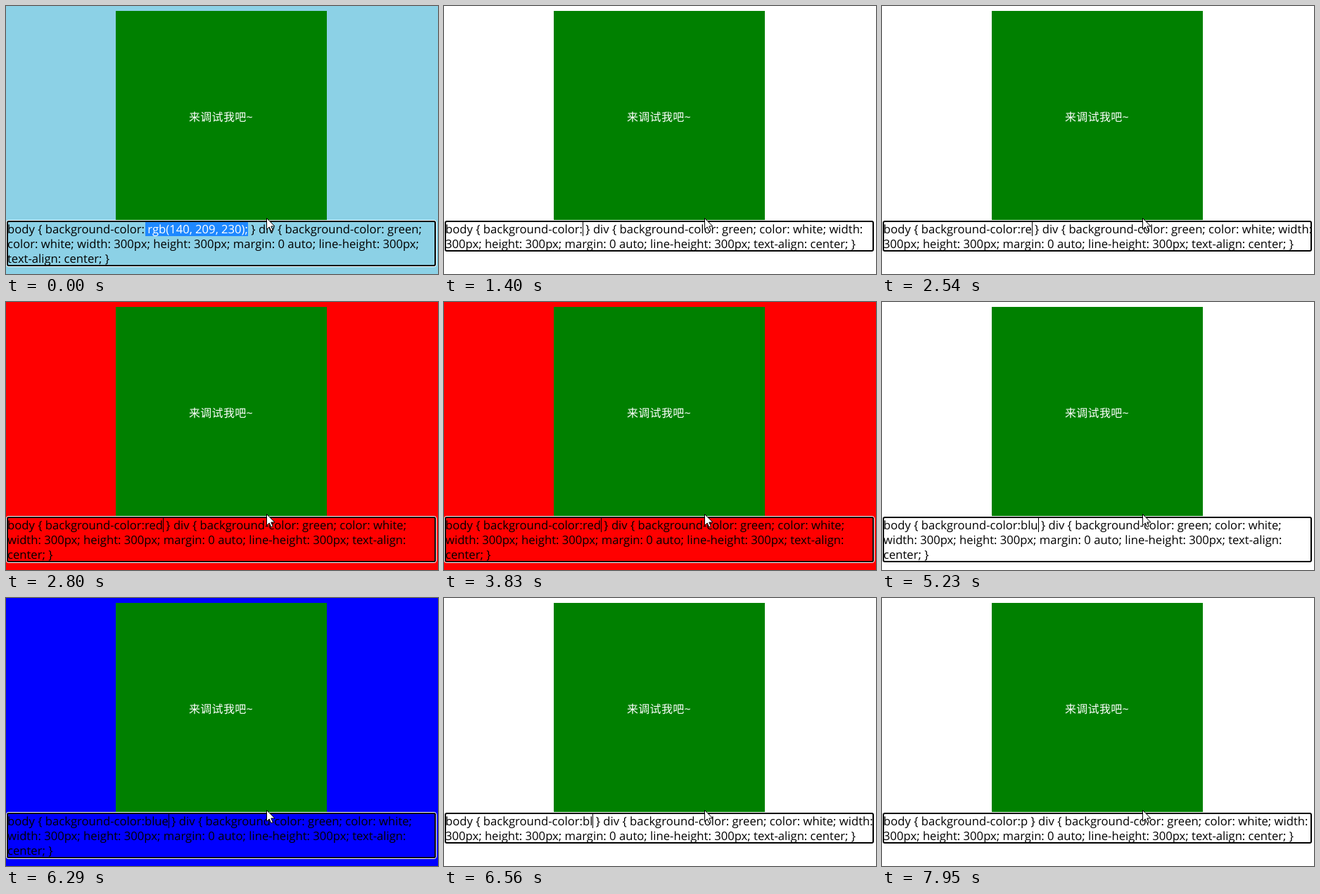
An HTML page that plays this animation: 614x382 px, repeating every 8 s.

```html
<!DOCTYPE html>
<html lang="zh">
<head>
<meta charset="utf-8">
<style>
  html, body { margin: 0; width: 100%; height: 100%; overflow: hidden; }
  #stage {
    position: relative; width: 614px; height: 382px; overflow: hidden;
    font-family: "Open Sans", "Noto Sans CJK SC", "Noto Sans CJK", sans-serif;
    text-rendering: geometricPrecision;
  }
  #stage > * { position: absolute; }
  #box { left: 156px; top: 7px; width: 300px; height: 300px; background: green; }
  #box span {
    position: absolute; left: 104px; top: 1px; white-space: nowrap;
    font-size: 16px; line-height: 300px; letter-spacing: .3px; color: #fff;
  }
  #ring {
    left: 1px; top: 306px; width: 610px; box-sizing: border-box;
    border: 2px solid #000; border-radius: 3px; box-shadow: 0 0 0 1px #fff;
  }
  #code {
    left: 2px; top: 307px; white-space: pre;
    font-size: 16.65px; line-height: 21px; color: #000;
  }
  #value.selected {
    display: inline-block; height: 21px; color: #fff;
    background: linear-gradient(#1e88ff, #1e88ff) 1px 1px no-repeat;
  }
  #caret {
    display: inline-block; vertical-align: top;
    width: 1px; height: 20px; margin: 1px -1px 0 0; background: #000;
  }
  #pointer { left: 370px; top: 302px; }
</style>
</head>
<body>
<div id="stage">
  <div id="box"><span>来调试我吧~</span></div>
  <div id="ring"></div>
  <div id="code">body { background-color:<span id="value"></span><span id="caret"></span><span id="rest"></span></div>
  <svg id="pointer" width="14" height="21">
    <path d="M.5 .5V16.5L4.2 13L6.8 18.8L9.3 17.8L6.8 12H12Z" fill="#fff" stroke="#000"/>
  </svg>
</div>
<script>
const LOOP = 8000;
const REST = " } div { background-color: green; color: white; width: 300px; height: 300px; " +
  "margin: 0 auto; line-height: 300px; text-align: center; }";
const RGB = " rgb(140, 209, 230);";

// [start ms, typed value, caret visible]
const steps = [
  [0, RGB, 0], [1400, "", 1], [1930, "", 0],
  [2470, "r", 1], [2540, "re", 1], [2800, "red", 1], [3170, "red;", 1],
  [3760, "red", 0], [3830, "red", 1], [3960, "re", 0], [4090, "r", 1],
  [4290, "", 0], [4350, "", 1],
  [4810, "b", 0], [4880, "b", 1], [5080, "bl", 1], [5230, "blu", 1],
  [5360, "blue", 1], [5890, "blue;", 1], [6290, "blue", 1],
  [6420, "blu", 1], [6560, "bl", 1], [6760, "b", 1],
  [6890, "", 0], [6960, "", 1], [7420, "p", 1], [7950, "p", 0]
];
const colors = { [RGB]: "rgb(140, 209, 230)", red: "red", "red;": "red", blue: "blue", "blue;": "blue" };

const $ = id => document.getElementById(id);

// Words that start a new line for a value of this length
function breaks(length) {
  if (length < 3) return ["300px; height"];
  return length < 6 ? ["width", "center"] : ["color: white", "text-align"];
}

function show([, value, caret]) {
  const words = breaks(value.length);
  $("value").textContent = value;
  $("value").className = value === RGB ? "selected" : "";
  $("caret").style.visibility = caret ? "visible" : "hidden";
  $("rest").textContent = words.reduce((s, w) => s.replace(" " + w, "\n" + w), REST);
  $("ring").style.height = (words.length + 1) * 21 + 2 + "px";
  $("stage").style.background = colors[value] || "#fff";
}

let current;
function tick() {
  const t = performance.now() % LOOP;
  const step = steps.findLast(s => s[0] <= t);
  if (step !== current) show(current = step);
  requestAnimationFrame(tick);
}
tick();
</script>
</body>
</html>
```
